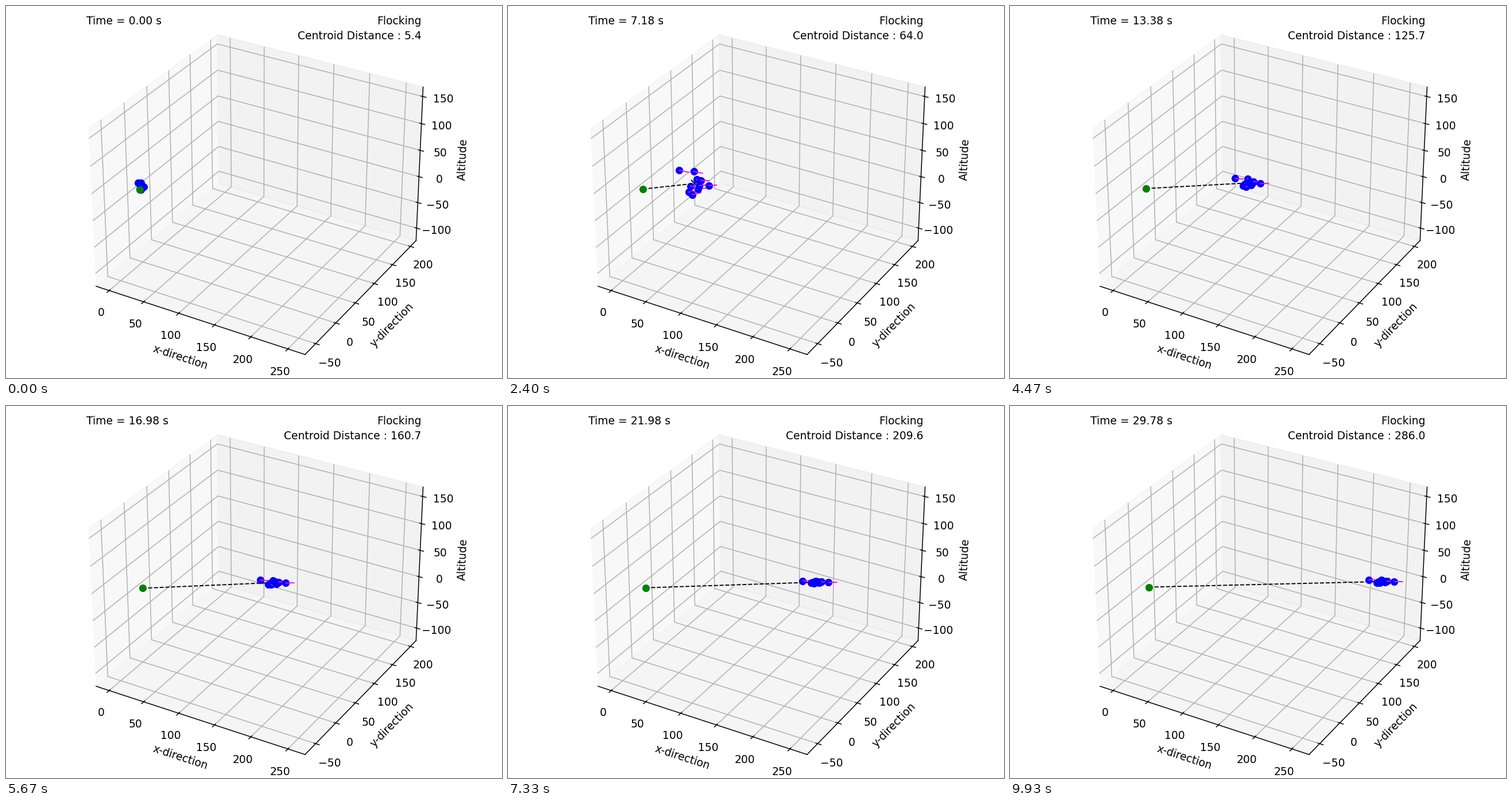
These frames come from a looping animation (864 by 648 pixels, 9.99 s). A matplotlib script:

```python
import numpy as np
import matplotlib.pyplot as plt
from matplotlib.animation import FuncAnimation

W, H, DPI = 864, 648, 135
FRAMES, LOOP_MS = 150, 9990
END = 29.78    # seconds of flight
SCALE = 1.42   # pixels per unit along the flight path

# Key points of the flight: distance flown, flock width, flock height
KNOTS = np.array([0, 3, 4.58, 9.98, 16.98, END])
FLIGHT = np.array([
    [5.4, 0.22, 0.23],
    [25.0, 0.78, 0.96],
    [38.7, 1.1, 1.0],
    [92.5, 0.97, 0.46],
    [160.7, 1.0, 0.15],
    [286.0, 1.0, 0.1],
])
# Places in the flock at full width and height, from rear to front
PLACES = np.array([
    (-23.5, -29), (-9, 19), (-6.5, 6), (-4, 24.5), (-1.5, -26.5),
    (3, -8.5), (4.5, 12.5), (7, 4.5), (9, -7), (21.3, 4.5),
])


def knot_slopes(values):
    """Slopes of a smooth curve through the key points."""
    h = np.diff(KNOTS)[:, None]
    sec = np.diff(values, axis=0) / h
    inner = (h[1:] * sec[:-1] + h[:-1] * sec[1:]) / (h[1:] + h[:-1])
    first = 1.5 * sec[0] - 0.5 * inner[0]
    return np.vstack([first, inner, sec[-1]])


SLOPES = knot_slopes(FLIGHT)


def flight_state(t):
    """Distance, width and height of the flock at time t."""
    i = int(np.clip(np.searchsorted(KNOTS, t) - 1, 0, len(KNOTS) - 2))
    h = KNOTS[i + 1] - KNOTS[i]
    s = (t - KNOTS[i]) / h
    return (FLIGHT[i] + (FLIGHT[i + 1] - FLIGHT[i]) * s * s * (3 - 2 * s)
            + h * s * (1 - s) * (SLOPES[i] * (1 - s) - SLOPES[i + 1] * s))


def home_at(t):
    return np.array([232.5 + 9.5 * t / END, 320 - 4.5 * t / END])


def flock_at(t):
    distance, width, height = flight_state(t)
    x = home_at(t)[0] + SCALE * np.sqrt(max(distance ** 2 - 25, 0))
    y = 310.2 - 0.15 * t + 4.1 * np.exp(-t / 1.2)
    return np.array([x, y]) + PLACES * [width, height]


def velocity_at(t, dt=0.05):
    return (flock_at(t + dt) - flock_at(t - dt)) / (2 * dt)


fig = plt.figure(figsize=(W / DPI, H / DPI), dpi=DPI)
space = fig.add_axes([0, 0, 1, 1], projection="3d")
HALF = 146
space.set_xlim(126.8 - HALF, 126.8 + HALF)
space.set_ylim(70.3 - HALF, 70.3 + HALF)
space.set_zlim(21.3 - HALF, 21.3 + HALF)
space.set_xlabel("x-direction")
space.set_ylabel("y-direction")
space.set_zlabel("Altitude")
clock = space.text2D(0.05, 0.951, "", transform=space.transAxes)
space.text2D(0.95, 0.951, "Flocking", ha="right", transform=space.transAxes)
readout = space.text2D(0.95, 0.91, "", ha="right", transform=space.transAxes)

# Flat layer in stage pixels on top of the 3D box
stage = fig.add_axes([0, 0, 1, 1])
stage.set_xlim(0, W)
stage.set_ylim(H, 0)
stage.axis("off")

link, = stage.plot([], [], "k--", lw=1)
centre, = stage.plot([], [], "kx")
birds = []
for _ in PLACES:
    dot, = stage.plot([], [], "o", color="blue")
    heading, = stage.plot([], [], color="magenta", lw=1)
    birds.append((dot, heading))
home, = stage.plot([], [], "o", color="green")


def update(k):
    t = max(0, 0.2 * k - 0.02)
    flock = flock_at(t)
    ahead = flock + velocity_at(t)
    mid = flock.mean(axis=0)
    base = home_at(t)

    for (dot, heading), p, q in zip(birds, flock, ahead):
        dot.set_data([p[0]], [p[1]])
        heading.set_data([p[0], q[0]], [p[1], q[1]])
        heading.set_visible(k > 0)
    link.set_data([base[0], mid[0]], [base[1], mid[1]])
    centre.set_data([mid[0]], [mid[1]])
    home.set_data([base[0]], [base[1]])

    clock.set_text(f"Time = {t:.2f} s")
    readout.set_text(f"Centroid Distance : {flight_state(t)[0]:.1f}")
    return []


anim = FuncAnimation(fig, update, frames=FRAMES, interval=LOOP_MS / FRAMES,
                     init_func=lambda: update(0), repeat=True)
plt.show()
```
